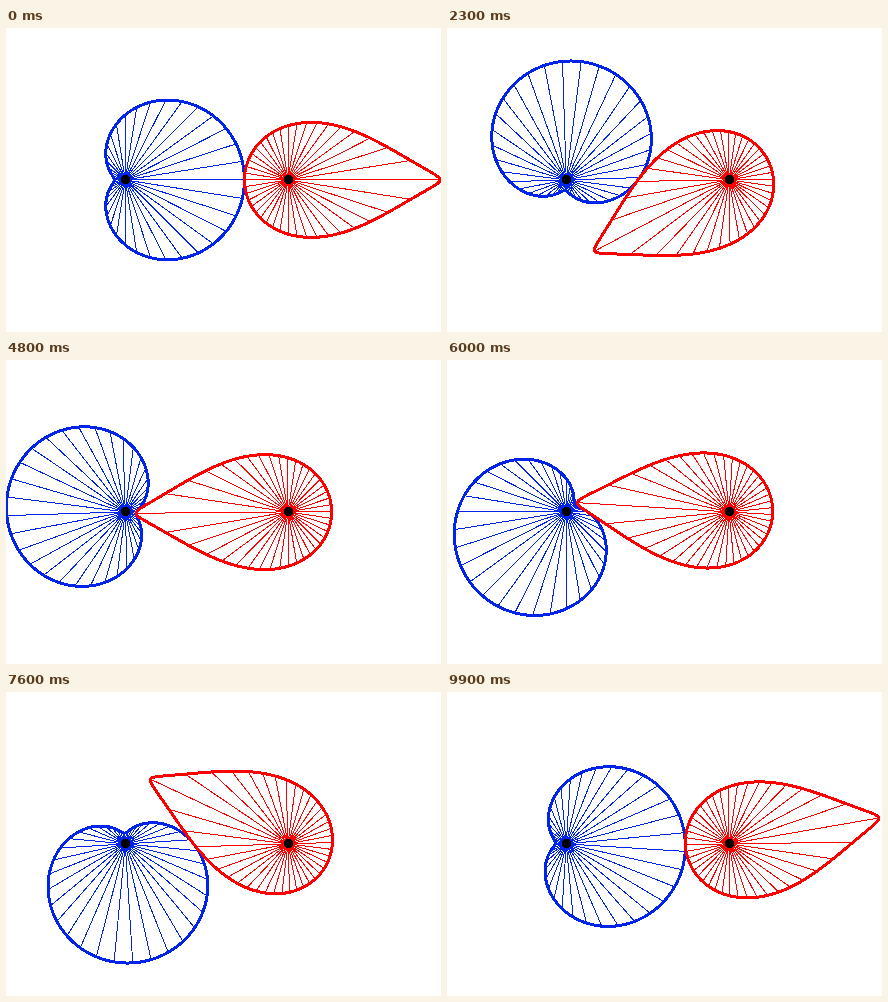
Write an HTML page that moves like this. It is 435 px wide and 304 px high and loops after 10000 ms.

```html
<!DOCTYPE html>
<html lang="en">
<head>
<meta charset="utf-8">
<title>Rolling limaçon gears</title>
<style>
  html, body { margin: 0; width: 100%; height: 100%; overflow: hidden; background: #fff; }
  svg { display: block; }
  path { fill: none; stroke-linejoin: round; }
  #blue { stroke: #0024e9; }
  #red { stroke: #f00; }
  .rim { stroke-width: 3; }
  .spokes { stroke-width: 1; }
</style>
</head>
<body>
<svg width="435" height="304" viewBox="0 0 435 304" shape-rendering="crispEdges">
  <g id="blue"><path class="spokes"/><path class="rim"/></g>
  <g id="red"><path class="spokes"/><path class="rim"/></g>
  <circle cx="119.5" cy="151.7" r="4.7"/>
  <circle cx="282.5" cy="151.7" r="4.7"/>
</svg>
<script>
const TAU = 2 * Math.PI;
const LOOP = 10000, STEPS = 100, SPOKES = 40, SAMPLES = 360;
const DIST = 162.8, BASE = 65, SWING = 54.2;
const CY = 151.9, BLUE_X = 119.25, RED_X = BLUE_X + DIST;

const radius = a => BASE + SWING * Math.cos(a);

// Turn of the red gear while the blue one turns by a (0..TAU), rolling without slip.
const K = Math.sqrt((DIST - BASE + SWING) / (DIST - BASE - SWING));
const redTurn = a => 4 * Math.atan2(K * Math.sin(a / 2), Math.cos(a / 2)) - a;

function blueAngleFor(turn) {
  let lo = 0, hi = TAU;
  for (let i = 0; i < 40; i++) {
    const mid = (lo + hi) / 2;
    if (redTurn(mid) < turn) lo = mid; else hi = mid;
  }
  return (lo + hi) / 2;
}

// Points are polar pairs [radius, angle] around the gear's pivot.
const bluePoint = a => [radius(a), a];
const redPoint = a => [DIST - radius(a), Math.PI - redTurn(a)];
const redSpokeEnd = a => [DIST - radius(blueAngleFor(a)), Math.PI - a];

const each = (n, fn) => Array.from({ length: n }, (_, i) => fn(i / n * TAU));

function makeGear(id, x, rimPoint, spokeEnd) {
  const [spokePath, rimPath] = document.getElementById(id).children;
  const rim = each(SAMPLES, rimPoint);
  const spokes = each(SPOKES, spokeEnd);
  return turn => {
    const xy = ([r, a]) =>
      `${(x + r * Math.cos(a + turn)).toFixed(3)},${(CY + r * Math.sin(a + turn)).toFixed(3)}`;
    spokePath.setAttribute('d', spokes.map(p => `M${x},${CY}L${xy(p)}`).join(''));
    rimPath.setAttribute('d', 'M' + rim.map(xy).join('L') + 'Z');
  };
}

const turnBlue = makeGear('blue', BLUE_X, bluePoint, bluePoint);
const turnRed = makeGear('red', RED_X, redPoint, redSpokeEnd);

function draw(ms) {
  const step = Math.floor(ms % LOOP / LOOP * STEPS);
  const a = step / STEPS * TAU;
  turnBlue(-a);
  turnRed(redTurn(a));
}

const start = performance.now();
function tick() {
  draw(performance.now() - start);
  requestAnimationFrame(tick);
}
tick();
</script>
</body>
</html>
```
